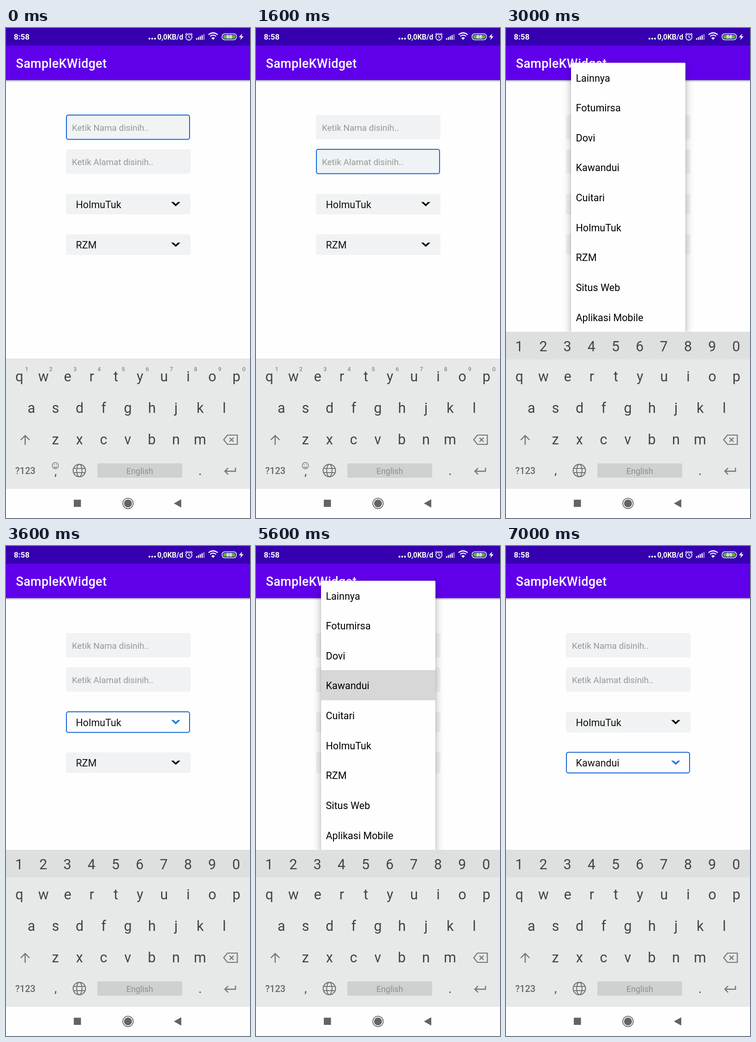
Recreate the animation shown at these times as an HTML page. Size 529 px wide and 1058 px high, loop 7700 ms.

```html
<!DOCTYPE html>
<html lang="id">
<head>
<meta charset="utf-8">
<title>SampleKWidget</title>
<style>
html, body { margin: 0; width: 100%; height: 100%; overflow: hidden; background: #fdfefd; }
body { font-family: Roboto, sans-serif; }
svg { position: absolute; left: 0; top: 0; }
#menu { position: absolute; left: 141px; width: 247.5px; overflow: hidden; border-radius: 2px;
  background: #fefefe; box-shadow: 0 6px 18px rgba(0,0,0,.3), 0 0 4px rgba(0,0,0,.12); }
#list { position: absolute; left: 0; width: 100%; }
#list div { height: 64.67px; padding-left: 10.5px; font: 21.55px/67px Roboto, sans-serif; color: #000; white-space: pre; }
</style>
</head>
<body>
<svg id="app" width="529" height="1058"></svg>
<div id="menu"><div id="list"></div></div>
<svg id="keys" width="529" height="1058"></svg>
<script>
const $ = id => document.getElementById(id);
const BLUE = '#1766d8', GREY = '#f1f2f4';
const items = ['Lainnya', 'Fotumirsa', 'Dovi', 'Kawandui', 'Cuitari', 'HolmuTuk', 'RZM', 'Situs Web', 'Aplikasi Mobile'];

const text = (s, x, y, size, fill, more = '') =>
  `<text x="${x}" y="${y}" font-size="${size}" fill="${fill}" ${more}>${s}</text>`;
const rect = (x, y, w, h, fill, more = '') =>
  `<rect x="${x}" y="${y}" width="${w}" height="${h}" fill="${fill}" ${more}/>`;
const circle = (x, y, r, more) => `<circle cx="${x}" cy="${y}" r="${r}" ${more}/>`;
const stroke = (d, color, width, more = '') =>
  `<path d="${d}" fill="none" stroke="${color}" stroke-width="${width}" ${more}/>`;
const mid = 'text-anchor="middle"';

function field(id, y, h) {
  return rect(130, y, 270, h, GREY, `id="${id}" rx="4"`);
}
function chevron(id, y) {
  return `<path id="${id}" d="M358 ${y}h5.5l4.5 4.6 4.5-4.6h5.5l-10 9.2z"/>`;
}

function statusBar() {
  const bars = [0, 1, 2, 3, 4].map(i =>
    rect(412 + i * 4, 22 - i * 2.2, 2.4, 3.5 + i * 2.2, '#fff', i > 3 ? 'opacity=".55"' : '')).join('');
  const arcs = [10, 6.5].map(r =>
    stroke(`M${449 - r} ${24.5 - r}Q449 ${24.5 - r * 1.8} ${449 + r} ${24.5 - r}`, '#fff', 2.2)).join('');
  return rect(0, 0, 529, 38, '#3600b1') +
    text('8:58', 17, 25, 17, '#fff', 'font-weight="700"') +
    [311, 317, 323].map(x => circle(x, 23, 2.1, 'fill="#fff"')).join('') +
    text('0,0KB/d', 328, 24.5, 15.6, '#fff', 'font-weight="700"') +
    circle(396.5, 19.5, 6.6, 'fill="none" stroke="#fff" stroke-width="1.6"') +
    stroke('M396.5 15.5v4.5l3 2M388.5 14.5l4-3.5M404.5 14.5l-4-3.5', '#fff', 1.5) +
    bars + arcs + '<path d="M445 21.5q4-3 8 0l-4 4z" fill="#fff"/>' +
    rect(468.5, 12.5, 31, 13, 'none', 'rx="5.5" stroke="#fff" stroke-width="1.5"') +
    rect(471, 15, 26, 8, '#55b82e', 'rx="3"') +
    text('88', 484, 23, 11, '#fff', `id="battery" font-weight="700" ${mid}`) +
    '<path d="M512 12l-7 8h4.5l-1.5 6 7-8h-4.5z" fill="#fff"/>';
}

const barShadow = [0, 1, 2, 3, 4].map(i =>
  rect(0, 112 + i, 529, 1, '#000', `opacity="${0.3 * (1 - i / 5) ** 1.2}"`)).join('');

$('app').innerHTML =
  rect(0, 0, 529, 1058, '#fdfefd') + barShadow +
  rect(0, 37, 529, 75.5, '#6000eb') + statusBar() +
  text('SampleKWidget', 21.5, 85.7, 26.94, '#fff', 'font-weight="500" letter-spacing=".36"') +
  field('name', 188, 52.5) + field('address', 262, 52.5) + field('first', 358, 44.5) + field('second', 445.5, 44.5) +
  text('Ketik Nama disinih..', 143, 222, 18.86, '#969799') +
  text('Ketik Alamat disinih..', 143, 296, 18.86, '#969799') +
  rect(143, 203, 2, 24, '#6200ee', 'id="caret"') +
  text(items[5], 151.5, 388.6, 21.55, '#111') +
  text(items[6], 151.5, 476.2, 21.55, '#111', 'id="choice"') +
  chevron('firstArrow', 375.8) + chevron('secondArrow', 463.4);

$('list').innerHTML = items.map(s => `<div>${s}</div>`).join('');

function keyRow(chars, x0, y) {
  return [...chars].map((c, i) => text(c, x0 + i * 52.28, y, 30.5, '#444', mid)).join('');
}
const hints = [...'1234567890'].map((c, i) =>
  text(c, 45 + i * 52.3, 741, 13, '#8a8b8b', `font-weight="500" ${mid}`)).join('');
const ICON = '#747575';

$('keys').innerHTML =
  rect(0, 715, 529, 280, '#e7e9e9') +
  `<g id="numbers">${rect(0, 656, 529, 59.5, '#dee0df')}${keyRow('1234567890', 28.5, 698)}</g>` +
  `<g id="hints">${rect(0, 714, 529, 1.5, '#dfe1e1')}${hints}` +
    circle(107, 945, 6.8, `fill="none" stroke="${ICON}" stroke-width="1.4"`) +
    circle(104.5, 943, 1, `fill="${ICON}"`) + circle(109.5, 943, 1, `fill="${ICON}"`) +
    stroke('M103.5 947q3.5 4 7 0', ICON, 1.3) + '</g>' +
  keyRow('qwertyuiop', 29, 763) + keyRow('asdfghjkl', 55, 831) + keyRow('zxcvbnm', 107, 898.5) +
  stroke('M41.5 900v-20M32 889.5l9.5-9.5 9.5 9.5', ICON, 2.4) +
  stroke('M480 879h21.5v20H480l-8-10zM484.5 884.5l9 9M493.5 884.5l-9 9', ICON, 2.2) +
  text('?123', 42, 963, 20, '#666', `font-weight="500" ${mid}`) +
  text(',', 107.5, 964, 26, '#444', `id="comma" ${mid}`) +
  circle(159, 955.5, 13.4, `fill="none" stroke="${ICON}" stroke-width="2.2"`) +
  `<ellipse cx="159" cy="955.5" rx="5.8" ry="13.4" fill="none" stroke="${ICON}" stroke-width="2"/>` +
  stroke('M147 951h24M147 960h24', ICON, 2) +
  rect(198, 940, 184, 31, '#cfd0d0', 'rx="3"') +
  text('English', 290, 962.5, 17.9, '#8d8e8e', mid) +
  text('.', 421, 964.5, 28, '#444', mid) +
  stroke('M497.5 949.5v7.5H475M481.5 950l-7 7 7 7', ICON, 2.4) +
  rect(0, 995, 529, 63, '#fefefe') +
  rect(147, 1018.5, 15.5, 15.5, '#636363') +
  circle(264.5, 1026.5, 11.3, 'fill="none" stroke="#555" stroke-width="1.5"') +
  circle(264.5, 1026.5, 8.6, 'fill="#636363"') +
  '<path d="M364 1026.5l16-9v18z" fill="#636363"/>';

// Each popup: first visible moment, fade start and end, anchor centre, chosen row.
const popups = [
  { open: 2300, press: 3300, close: 3600, anchor: 380, row: 5 },
  { open: 4400, press: 5600, close: 6000, anchor: 468, row: 3 }
];
const FULL = 582, CENTRE = 365.5;

function focus(id, on, fill) {
  const box = $(id), inset = on ? 1 : 0;
  box.setAttribute('fill', on ? fill : GREY);
  box.setAttribute('stroke', on ? BLUE : 'none');
  box.setAttribute('stroke-width', 2);
  box.setAttribute('x', 130 + inset);
  box.setAttribute('width', 270 - 3 * inset);
  if ($(id + 'Arrow')) $(id + 'Arrow').setAttribute('fill', on ? '#1a73e8' : '#000');
}

function drawMenu(t) {
  const p = popups.find(p => t >= p.open && t < p.close), menu = $('menu');
  menu.style.display = p ? '' : 'none';
  if (!p) return;
  // The popup unrolls from its anchor towards its resting place.
  const grow = Math.min(1, (t - p.open + 50) / 300), rest = (1 - grow) ** 1.87;
  const shift = (p.anchor - CENTRE) * rest;
  const height = FULL - (FULL - 44) * rest, top = CENTRE + shift - height / 2;
  const fade = Math.max(0, (t - p.press) / (p.close - p.press));
  menu.style.top = top + 'px';
  menu.style.height = height + 'px';
  menu.style.opacity = Math.min(1, grow * 4) * (1 - fade ** 1.55);
  menu.style.background = fade ? '#e8e9e8' : '#fefefe';
  $('list').style.top = CENTRE - FULL / 2 + shift - top + 'px';
  [...$('list').children].forEach((row, i) =>
    row.style.background = t >= p.press && i === p.row ? '#d6d7d6' : '');
}

function draw(now) {
  const t = Math.floor(now % 7700 / 100) * 100;
  const within = (a, b) => t >= a && t < b;
  const show = (id, on) => $(id).setAttribute('visibility', on ? 'visible' : 'hidden');
  focus('name', t < 1000, '#f1f3f4');
  focus('address', within(1000, 2300), '#f0f3f5');
  focus('first', within(3400, 4400), '#fefefe');
  focus('second', t >= 5700, '#fefefe');
  show('caret', within(400, 900) || within(1000, 1600) || within(2100, 2300));
  $('caret').setAttribute('y', t < 1000 ? 203 : 277);
  const numeric = t >= 2400;
  show('numbers', numeric);
  show('hints', !numeric);
  $('comma').setAttribute('y', numeric ? 964 : 966);
  $('choice').textContent = items[t >= 5700 ? 3 : 6];
  $('battery').textContent = t >= 6300 ? '89' : '88';
  drawMenu(t);
}

let start;
function tick(now) {
  start ??= now;
  draw(now - start);
  requestAnimationFrame(tick);
}
draw(0);
requestAnimationFrame(tick);
</script>
</body>
</html>
```
